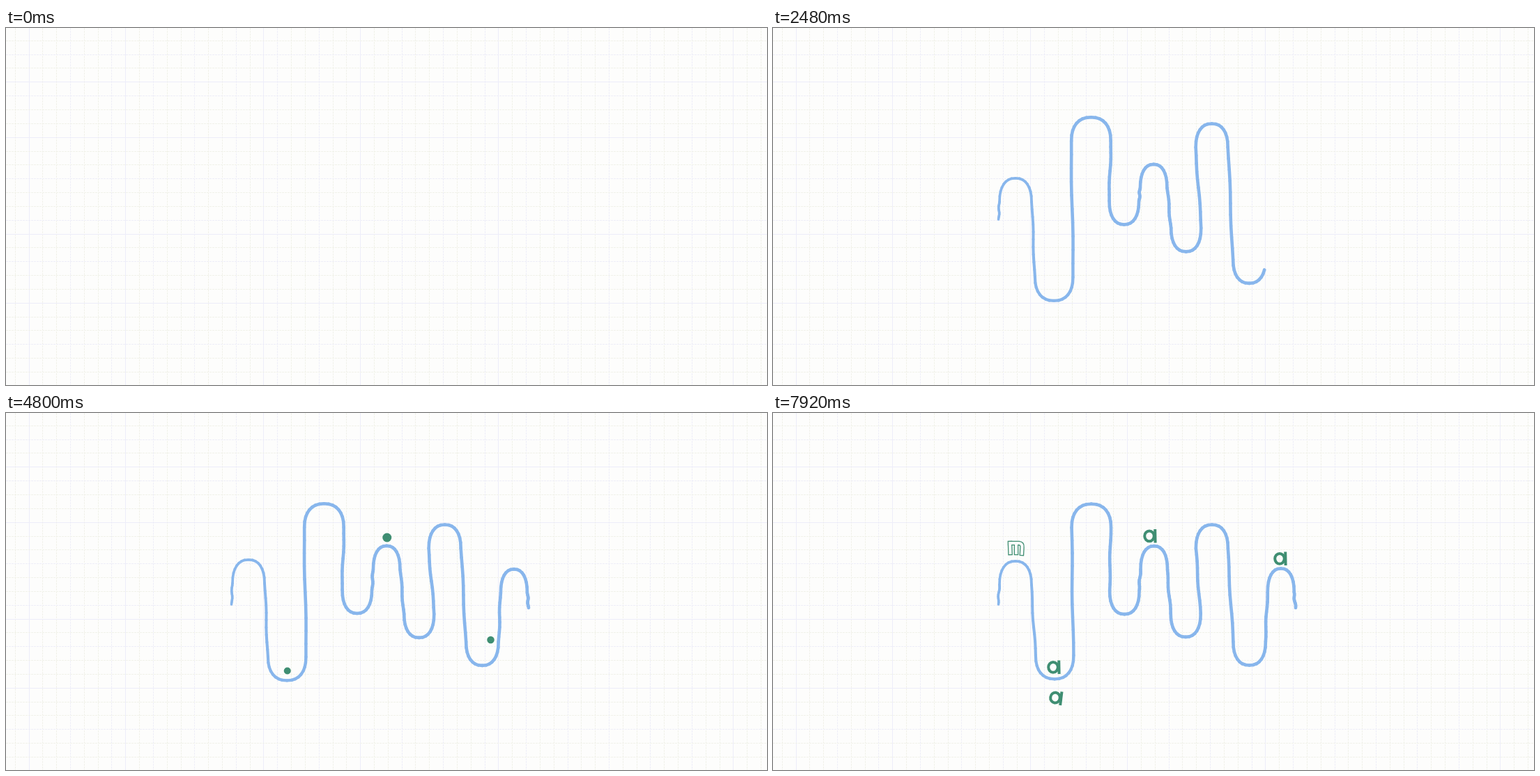
An HTML page with a canvas for the animation above (8000 ms loop, 1092 by 513 pixels).

```html
<!DOCTYPE html>
<html lang="en">
<head>
<meta charset="utf-8">
<title>Wavy line</title>
<style>
  html, body { margin: 0; width: 100%; height: 100%; overflow: hidden; background: #fdfdfc; }
  canvas { display: block; }
</style>
</head>
<body>
<canvas id="stage" width="1092" height="513"></canvas>
<script>
const W = 1092, H = 513, LOOP = 8000, STEP = 80;
const PAPER = '#fdfdfc', BLUE = '#88b6ec', GREEN = '#3f8e72';
const ctx = document.getElementById('stage').getContext('2d');
const lerp = (a, b, k) => a + (b - a) * k;
const clamp = v => Math.max(0, Math.min(1, v));
const ramp = (t, from, to) => clamp((t - from) / (to - from));
const ease = k => (1 - Math.cos(Math.PI * k)) / 2;

// Alternating crests and troughs: left, right, height while drawn, height once settled.
const BENDS = [
  [325, 371, 217, 212], [376.5, 431, 391, 383.5], [428.5, 485, 128, 130],
  [483, 525.5, 283, 288.5], [527.5, 566, 197, 192], [571, 614, 321, 322.5],
  [607, 653, 138, 161], [660, 706.5, 366, 362], [710, 748, 225, 224.5]
];
const START = [323.5, 275], END = [750, 280];

// Several takes with a slightly shaky hand; cycling them makes the line boil.
const TAKES = 4;
const shake = (take, n) => {
  const v = Math.sin(take * 78.23 + n * 12.99) * 43758.5;
  return (v - Math.floor(v) - 0.5) * 2.4;
};
const takesOf = settled => Array.from({ length: TAKES }, (_, take) => sketch(take, settled));
const freshTakes = takesOf(false), settledTakes = takesOf(true);

function sketch(take, settled) {
  const capHeight = 34, squareness = 0.86, out = [];
  const add = (x, y) => {
    const last = out[out.length - 1];
    const s = last ? last.s + Math.hypot(x - last.x, y - last.y) : 0;
    out.push({ x, y, s });
  };
  const wallTo = (x, y) => {
    const { x: x0, y: y0 } = out[out.length - 1];
    for (let i = 1; i <= 10; i++) {
      const k = i / 10;
      add(lerp(x0, x, k) + Math.sin(Math.PI * 2 * k + take) * Math.sin(Math.PI * k), lerp(y0, y, k));
    }
  };
  const soft = v => Math.sign(v) * Math.abs(v) ** squareness;

  add(...START);
  BENDS.forEach(([left, right, drawnY, settledY], i) => {
    const side = i % 2 ? -1 : 1;
    const apex = (settled ? settledY : drawnY) + shake(take, i);
    const middle = (left + right) / 2 + shake(take, i + 20) / 2, radius = (right - left) / 2;
    const base = apex + side * capHeight;
    wallTo(middle - radius, base);
    for (let j = 1; j <= 16; j++) {
      const angle = Math.PI * j / 16;
      add(middle - radius * soft(Math.cos(angle)), base - side * capHeight * soft(Math.sin(angle)));
    }
  });
  wallTo(...END);
  return out;
}

function line(x1, y1, x2, y2, width) {
  ctx.lineWidth = width;
  ctx.beginPath();
  ctx.moveTo(x1, y1);
  ctx.lineTo(x2, y2);
  ctx.stroke();
}

function drawGrid() {
  const strongColumns = [1, 8, 18, 25, 35, 52], strongRows = [3, 7, 14, 19];
  ctx.fillStyle = PAPER;
  ctx.fillRect(0, 0, W, H);
  ctx.lineCap = 'butt';
  const style = (strong, k) => {
    ctx.strokeStyle = strong ? '#ededf9' : k % 3 === 1 ? '#eeeef8' : '#f1f2ea';
    ctx.setLineDash(strong ? [] : [3, 1]);
  };
  for (let k = 0; 13.2 + k * 19.82 < W; k++) {
    const x = Math.floor(13.2 + k * 19.82) + 0.5;
    style(strongColumns.includes(k), k);
    line(x, 0, x, H, 1);
  }
  for (let k = 0; 18.3 + k * 19.84 < H; k++) {
    const y = Math.floor(18.3 + k * 19.84) + 0.5;
    style(strongRows.includes(k), k);
    line(0, y, W, y, 1);
  }
  ctx.setLineDash([]);
}

function drawWave(curve, length) {
  ctx.strokeStyle = BLUE;
  ctx.lineCap = 'round';
  for (let i = 1; i < curve.length && curve[i - 1].s < length; i++) {
    const a = curve[i - 1], b = curve[i], k = ramp(length, a.s, b.s);
    line(a.x, a.y, lerp(a.x, b.x, k), lerp(a.y, b.y, k), 3.6 + clamp(a.s / 400));
  }
}

// Balls hop from bend to bend, one after another, each to its own resting bend.
const HOP = 213.6, BALL_GAP = 171, FIRST_BALL = 2692, RESTS = [1, 4, 8];

function perch(i) {
  if (i < 0) return [306, 275, 5];
  const [left, right, , y] = BENDS[i];
  return [(left + right) / 2, y - 13, i % 2 ? 5 : 6.5];
}

function ballAt(n, t) {
  const start = FIRST_BALL + n * BALL_GAP;
  if (t < start) return null;
  const p = Math.min(RESTS[n], (t - start) / HOP - 1), i = Math.floor(p), k = p - i;
  const from = perch(i), to = perch(Math.min(i + 1, RESTS[n]));
  return [lerp(from[0], to[0], k), lerp(from[1], to[1], ease(k)), lerp(from[2], to[2], ease(k))];
}

function drawDot(x, y, r) {
  ctx.fillStyle = GREEN;
  ctx.beginPath();
  ctx.arc(x, y, r, 0, 7);
  ctx.fill();
}

function drawBalls(t, scale) {
  const balls = RESTS.map((_, n) => ballAt(n, t));
  const split = ramp(t, 5720, 6320);
  if (split > 0) {
    const [x, y, r] = balls[0], childX = x + 2, childY = y + 38 * split;
    ctx.strokeStyle = GREEN;
    ctx.lineCap = 'round';
    if (childY - y < 20) line(x, y, childX, childY, 4);
    balls.push([childX, childY, r - 0.5]);
  }
  for (const ball of balls) if (ball) drawDot(ball[0], ball[1], ball[2] * scale);
}

const LETTERS = [[403, 365, 0], [541, 176.5, 0], [728, 209, 0], [406, 409, 0.14]];

function drawLetterA([x, y, tilt], size) {
  ctx.save();
  ctx.translate(x, y);
  ctx.rotate(tilt);
  ctx.scale(size, size);
  ctx.strokeStyle = GREEN;
  ctx.lineCap = 'butt';
  ctx.lineWidth = 4;
  ctx.beginPath();
  ctx.ellipse(-1, 0.3, 6.8, 7.4, 0, 0, 7);
  ctx.stroke();
  line(7.2, -9.5, 7.6, 10, 4);
  ctx.restore();
}

function drawLetterM(progress) {
  ctx.save();
  ctx.beginPath();
  ctx.rect(334, 180, 30 * progress, 28);
  ctx.clip();
  ctx.lineCap = 'square';
  ctx.lineJoin = 'round';
  const m = new Path2D('M340 187 L340.5 201 M340 187 H353 Q358 187.5 357.5 193 L357 202 M349 188 L349 201');
  for (const [color, width] of [[GREEN, 6.6], [PAPER, 4]]) {
    ctx.strokeStyle = color;
    ctx.lineWidth = width;
    ctx.stroke(m);
  }
  ctx.restore();
}

function render(now) {
  const frame = Math.floor((now % LOOP) / STEP), t = frame * STEP;
  drawGrid();

  // The pen speeds up gently; the finished wave settles.
  const seconds = Math.max(0, t - 80) / 1000;
  const length = seconds * (520 + 44 * seconds);
  const takes = t > 2800 ? settledTakes : freshTakes;
  drawWave(takes[Math.floor(frame / 1.5) % TAKES], length);

  const morph = ramp(t, 6320, 6640);
  if (morph < 1) drawBalls(t, 1 - morph);
  if (morph > 0) LETTERS.forEach(letter => drawLetterA(letter, morph));
  if (t > 7040) drawLetterM(ramp(t, 7040, 7680));
}

function tick() {
  render(performance.now());
  requestAnimationFrame(tick);
}
tick();
</script>
</body>
</html>
```
